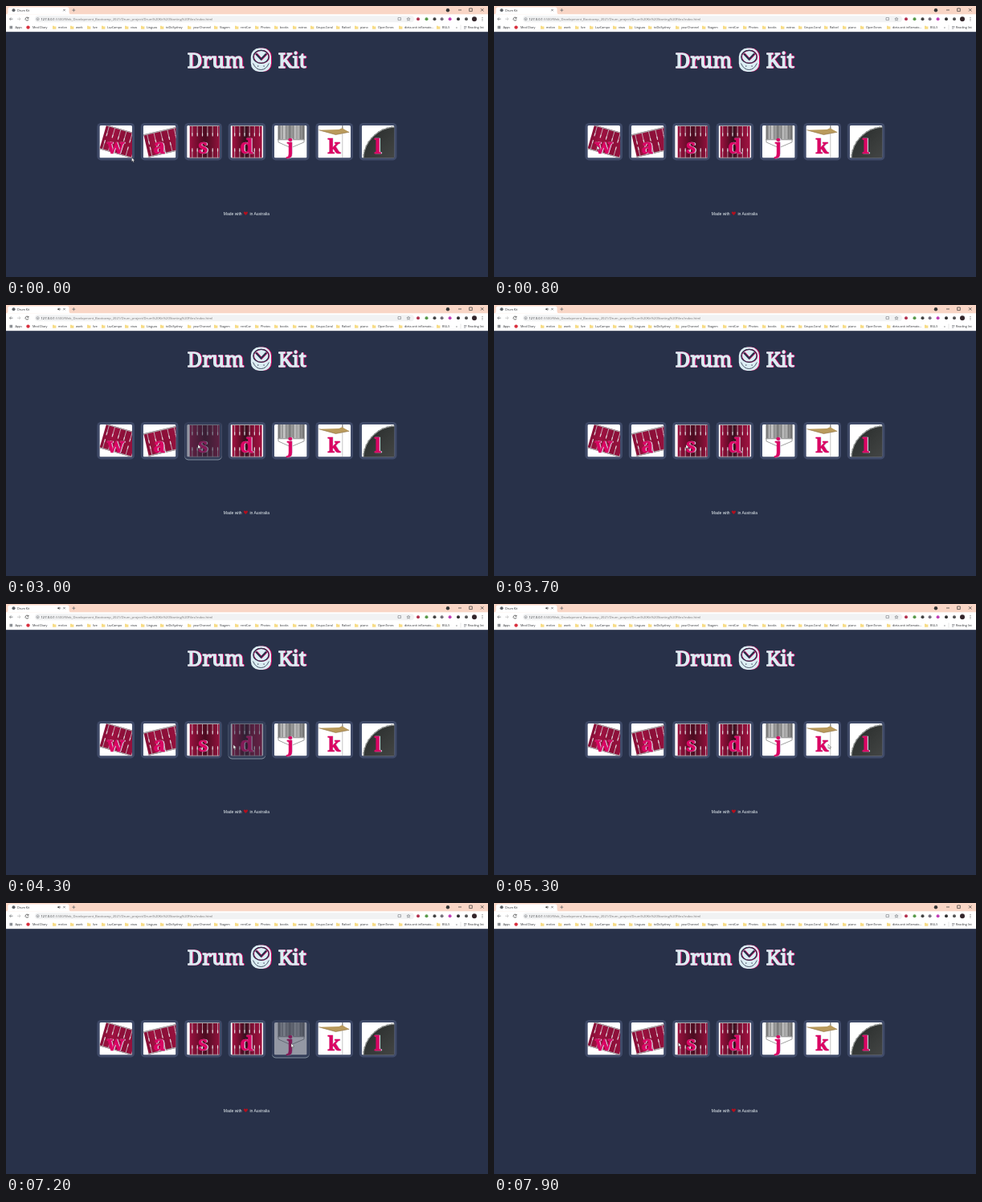
Recreate the animation shown at these times as an HTML page. Size 600 px wide and 338 px high, loop 8000 ms.

```html
<!DOCTYPE html>
<html lang="en">
<head>
<meta charset="utf-8">
<title>Drum Kit</title>
<style>
html, body { margin: 0; width: 100%; height: 100%; overflow: hidden; background: #283149; }
svg { display: block; width: 100vw; height: 100vh; }
.ui { font: 3.7px "Open Sans", "Noto Sans", sans-serif; fill: #2b2d30; }
.url { font-size: 4.13px; }
.title { font: 25.4px "Noto Serif", serif; stroke-width: 1.4px; stroke-linejoin: round; }
.letter { font: 700 25.5px "Noto Serif", serif; stroke-width: .5px; text-anchor: middle; }
.foot { font: 5px "Liberation Sans", Arial, sans-serif; fill: #edf5f8; }
.pink { fill: #da0463; stroke: #da0463; }
.pale { fill: #dbedf3; stroke: #dbedf3; }
.line { fill: none; stroke: #5f6368; stroke-width: .7; }
</style>
</head>
<body>
<svg id="stage" viewBox="0 0 600 338" preserveAspectRatio="none">
  <defs>
    <linearGradient id="red">
      <stop offset="0" stop-color="#860f37"/><stop offset=".25" stop-color="#a01241"/>
      <stop offset=".55" stop-color="#8a0f38"/><stop offset="1" stop-color="#9c1240"/>
    </linearGradient>
    <linearGradient id="shade">
      <stop offset="0" stop-color="#9a1240"/><stop offset=".3" stop-color="#6d0c2c"/>
      <stop offset=".5" stop-color="#4a0c20"/><stop offset="1" stop-color="#96123e"/>
    </linearGradient>
    <linearGradient id="deep">
      <stop offset="0" stop-color="#a01341"/><stop offset=".25" stop-color="#6d0c2c"/>
      <stop offset=".45" stop-color="#32101d"/><stop offset=".65" stop-color="#7c0d32"/>
      <stop offset="1" stop-color="#a01341"/>
    </linearGradient>
    <linearGradient id="steel">
      <stop offset="0" stop-color="#777"/><stop offset=".2" stop-color="#ccc"/>
      <stop offset=".45" stop-color="#858585"/><stop offset=".7" stop-color="#c4c4c4"/>
      <stop offset="1" stop-color="#6f6f6f"/>
    </linearGradient>
    <linearGradient id="dark" x2="1" y2="1">
      <stop offset="0" stop-color="#262a29"/><stop offset=".5" stop-color="#454746"/>
      <stop offset="1" stop-color="#2b2d2c"/>
    </linearGradient>
    <clipPath id="pane"><rect width="40.6" height="40.6" rx="1.6"/></clipPath>
    <filter id="soft" x="-20%" y="-20%" width="140%" height="140%"><feGaussianBlur stdDeviation=".6"/></filter>
  </defs>

  <rect width="600" height="338" fill="#283149"/>
  <rect width="600" height="32.2" fill="#fff"/>
  <rect width="600" height="10.3" fill="#f9d6c6"/>
  <path d="M0 10.4Q2.5 10.4 2.5 8V4Q2.5 1.5 5 1.5H76Q78.5 1.5 78.5 4V8Q78.5 10.4 81 10.4Z" fill="#fff"/>
  <rect x="36" y="12.3" width="472" height="8" rx="4" fill="#f1f2f3"/>

  <circle cx="9.5" cy="5.3" r="2" fill="#5f6368"/>
  <g class="line">
    <path d="M71.3 4l2.4 2.4m0-2.4l-2.4 2.4M82.3 5.2h4m-2-2v4"/>
    <path d="M563 5h4m9.7-2h3.6v3.6h-3.6zM591 3.2l3.4 3.4m0-3.4l-3.4 3.4" stroke="#333"/>
    <path d="M8.5 16.2H4.5l1.8-1.8m-1.8 1.8l1.8 1.8"/>
    <path d="M14 16.2h4l-1.8-1.8m1.8 1.8l-1.8 1.8" stroke="#b9b9b9"/>
    <path d="M27.6 14.8a2 2 0 1 0 .4 2m0-3v1.5h-1.6" stroke="#333"/>
    <circle cx="39.5" cy="16.3" r="1.6" stroke-width=".5"/><path d="M39.5 16v1.2" stroke-width=".5"/>
    <path d="M488 14.6h3.5v3H488z" stroke-width=".5"/>
    <path d="M501 14.2l.6 1.4 1.5.1-1.2 1 .4 1.5-1.3-.8-1.3.8.4-1.5-1.2-1 1.5-.1z" stroke-width=".5"/>
    <path d="M566 23.5v6" stroke="#ccc" stroke-width=".5"/>
    <path d="M570 25.5h3.5m-3.5 1.3h3.5m-3.5 1.3h2.3" stroke-width=".5"/>
  </g>
  <circle cx="550" cy="5.3" r="2.2" fill="#333"/>
  <g id="marks"></g>
  <g class="ui">
    <text x="14" y="6.6">Drum Kit</text>
    <text class="url" x="43.5" y="17.7">127.0.0.1<tspan fill="#777">:5500/Web_Development_Bootcamp_2021/Drum_project/Drum%20Kit%20Starting%20Files/index.html</tspan></text>
    <text x="560" y="27.9">»</text>
    <text x="575" y="27.9">Reading list</text>
  </g>
  <g id="sound" fill="#444">
    <path d="M64.3 4.6h1l1.2-1v3.5l-1.2-1h-1z"/>
    <path d="M67.3 4.2q1 1.1 0 2.2" fill="none" stroke="#444" stroke-width=".45"/>
  </g>
  <g id="bookmarks" class="ui"></g>

  <g id="title"></g>
  <g>
    <rect x="305.8" y="52.6" width="25.2" height="29.4" rx="10.5" fill="#da0463"/>
    <rect x="304.8" y="52.6" width="25.2" height="29.4" rx="10.5" fill="#dbedf3"/>
    <ellipse cx="318.1" cy="63.4" rx="9.6" ry="8" fill="none" stroke="#da0463" stroke-width="1.1"/>
    <ellipse cx="317.4" cy="63.4" rx="9.6" ry="8" fill="none" stroke="#283149" stroke-width="1.3"/>
    <path d="M311 59.5L317.4 66.5 324 59.5" fill="none" stroke="#da0463" stroke-width="2.2" transform="translate(.9)"/>
    <path d="M311 59.5L317.4 66.5 324 59.5" fill="none" stroke="#283149" stroke-width="2.2"/>
    <path d="M307.5 71.5Q311 79.5 317.4 79.5T327.3 71.5" fill="none" stroke="#283149" stroke-width=".8"/>
    <path d="M313 75h1.4m6 0h1.4" stroke="#283149"/>
  </g>

  <g id="tiles"></g>

  <text class="foot" x="270.8" y="260.6">Made with</text>
  <path d="M298.4 261C295.2 258.9 295.4 256.7 296.9 256.6Q298 256.6 298.4 257.5Q298.8 256.6 299.9 256.6C301.4 256.7 301.6 258.9 298.4 261Z" fill="#b30f1d"/>
  <text class="foot" x="303.5" y="260.6">in Australia</text>

  <path id="cursor" d="M0 0V5.2L1.2 4.1 2 5.9 2.9 5.5 2.1 3.8H3.7Z" fill="#fff" stroke="#222" stroke-width=".35"/>
</svg>
<script>
const LOOP = 8000;
const $ = id => document.getElementById(id);

// Browser bar
const bookmarks = [
  [60, "melon"], [82, "work"], [103, "live"], [121, "LuzCampo"], [150, "visas"],
  [170, "Linguas"], [194, "toDoSydney"], [228, "yourChannel"], [261, "Viagem"],
  [287, "rentCar"], [312, "Photos"], [336, "books"], [359, "extras"],
  [381, "Grupo.Coral"], [413, "Rafael"], [436, "piano"], [458, "OpenTones"],
  [491, "dieta anti inflamato..."], [538, "BILLS"]
];
const folder = x => `<path d="M${x - 2} 24.8h1.6l.6.7h2.2v3.2h-4.4z" fill="#f7dc85"/>`;
$("bookmarks").innerHTML =
  `<rect x="4.5" y="24.8" width="3.6" height="3.6" fill="#8b8f94"/><text x="11.5" y="27.9">Apps</text>
   <circle cx="27.5" cy="26.6" r="2.2" fill="#d9303e"/><text x="33" y="27.9">Meal Diary</text>` +
  bookmarks.map(([x, name]) => `${folder(x)}<text x="${x + 5}" y="27.9">${name}</text>`).join("");

const marks = [[513, "#b3324f"], [523.5, "#5a9a4a"], [533.5, "#444"], [542.6, "#77707c"],
  [552.6, "#c23fb5"], [563, "#333"], [573, "#555"]];
$("marks").innerHTML =
  marks.map(([x, c]) => `<circle cx="${x}" cy="16.2" r="2" fill="${c}"/>`).join("") +
  `<circle cx="583" cy="16.2" r="3" fill="#33252a"/>` +
  [14.5, 16.2, 17.9].map(y => `<circle cx="593" cy="${y}" r=".5" fill="#444"/>`).join("");

// Two layers of lettering, the lower one shifted right
const layered = (cls, text, x, y, under, over) =>
  `<text class="${cls} ${under}" x="${x + 1}" y="${y}">${text}</text>
   <text class="${cls} ${over}" x="${x}" y="${y}">${text}</text>`;
$("title").innerHTML = layered("title", "Drum", 225.7, 76.6, "pink", "pale") +
  layered("title", "Kit", 338.8, 76.6, "pink", "pale");

// Tile pictures
function drum(place, w, h, fill, count) {
  let rods = "", lugs = "";
  for (let i = 0; i < count; i++) {
    const x = w * (i + .5) / count;
    rods += `M${x} 0V11M${x} ${h - 10}V${h}`;
    lugs += `M${x} 10v3M${x} ${h - 12}v3`;
  }
  return `<g transform="${place}"><rect width="${w}" height="${h}" fill="url(#${fill})"/>
    <path d="${rods}" stroke="#c9bfc5" stroke-width=".8"/>
    <path d="${lugs}" stroke="#e2dce0" stroke-width="1.2" stroke-linecap="round"/>
    <path d="M-.5 .5H${w + .5}M-.5 ${h - .5}H${w + .5}" stroke="#a9a5a7" stroke-width="1.3"/></g>`;
}

function snare() {
  let ribs = "";
  for (let x = 6; x < 38; x += 4.4) ribs += `M${x} 0V17`;
  return `<rect x="4.5" width="33" height="17.5" fill="url(#steel)"/>
    <path d="${ribs}" stroke="#666" stroke-width=".7"/>
    <path d="M4 17.8H38" stroke="#888" stroke-width="1.1"/>
    <path d="M5 18v3L20.5 28 37 21v-3M20.5 18V40" fill="none" stroke="#888" stroke-width=".8"/>`;
}

const hat = () => `<path d="M30.4 1V40" stroke="#b5b5b5" stroke-width=".8"/>
  <path d="M30.5 0V5" stroke="#555" stroke-width=".8"/>
  <path d="M1 5.8L26 5 30 3.4 33 5.2 39 8.4 31 9.8 22 11.6Z" fill="#b99a5c"/>
  <path d="M1 5.8L22 11.6 39 8.4" fill="none" stroke="#86693a" stroke-width=".6"/>`;

const bass = () => `<circle cx="43" cy="43" r="41" fill="url(#dark)"/>
  <circle cx="43" cy="43" r="41" fill="none" stroke="#8d918f" stroke-width="1.2"/>
  <circle cx="43" cy="43" r="41.5" fill="none" stroke="#777" stroke-width="1" stroke-dasharray="1.4 4.5"/>`;

const tiles = [
  ["w", drum("translate(8.6 -.5) rotate(16)", 45, 31, "red", 6)],
  ["a", drum("translate(.5 11.5) rotate(-13)", 43, 29, "red", 5)],
  ["s", drum("translate(3.5 0)", 38, 41, "shade", 6)],
  ["d", drum("translate(2 0)", 37, 41, "deep", 6)],
  ["j", snare()], ["k", hat()], ["l", bass()]
];
$("tiles").innerHTML = tiles.map(([key, art], i) => `
  <g id="key-${key}" transform="translate(${113.4 + i * 54.4} 145.9)">
    <rect class="glow" y="1" width="46.6" height="46.6" rx="4.7" fill="#dbedf3" filter="url(#soft)" visibility="hidden"/>
    <rect width="46.6" height="46.6" rx="4.7" fill="#404b69"/>
    <g transform="translate(3 3)" clip-path="url(#pane)">
      <rect width="40.6" height="40.6" fill="#fff"/>${art}
    </g>
    ${layered("letter", key, 23, 38, "pale", "pink")}
  </g>`).join("");

// Pointer path: time, x, y
const path = [
  [0, 156.5, 189], [300, 156.5, 189], [900, 126, 173], [2050, 126, 173],
  [2300, 182, 174], [2550, 182, 174], [2800, 239, 174], [3800, 239, 174],
  [4150, 283, 175.5], [4450, 283, 175.5], [4700, 338, 175], [4900, 338, 175],
  [5200, 416, 175], [5600, 416, 175], [5900, 452, 175], [6150, 452, 175],
  [6420, 418, 175], [6850, 418, 175], [7100, 355, 175], [7250, 355, 175],
  [7450, 300, 175], [7600, 300, 175], [7850, 229.5, 174], [8000, 229.5, 174]
];
const presses = [
  [1920, "w"], [2380, "a"], [2920, "s"], [4230, "d"], [4770, "j"], [5400, "k"],
  [6000, "l"], [6650, "k"], [7130, "j"], [7480, "d"]
];
const HOLD = 150;

function pointerAt(t) {
  const i = Math.max(1, path.findIndex(p => p[0] > t));
  const [t0, x0, y0] = path[i - 1], [t1, x1, y1] = path[i];
  const u = (t - t0) / (t1 - t0), e = u * u * (3 - 2 * u);
  return [x0 + (x1 - x0) * e, y0 + (y1 - y0) * e];
}

function draw() {
  const t = performance.now() % LOOP;
  $("cursor").setAttribute("transform", `translate(${pointerAt(t)})`);
  $("sound").setAttribute("visibility", t >= presses[0][0] ? "visible" : "hidden");
  for (const [key] of tiles) {
    const down = presses.some(([at, k]) => k === key && t >= at && t < at + HOLD);
    const tile = $("key-" + key);
    tile.setAttribute("opacity", down ? .5 : 1);
    tile.querySelector(".glow").setAttribute("visibility", down ? "visible" : "hidden");
  }
  requestAnimationFrame(draw);
}
draw();
</script>
</body>
</html>
```
